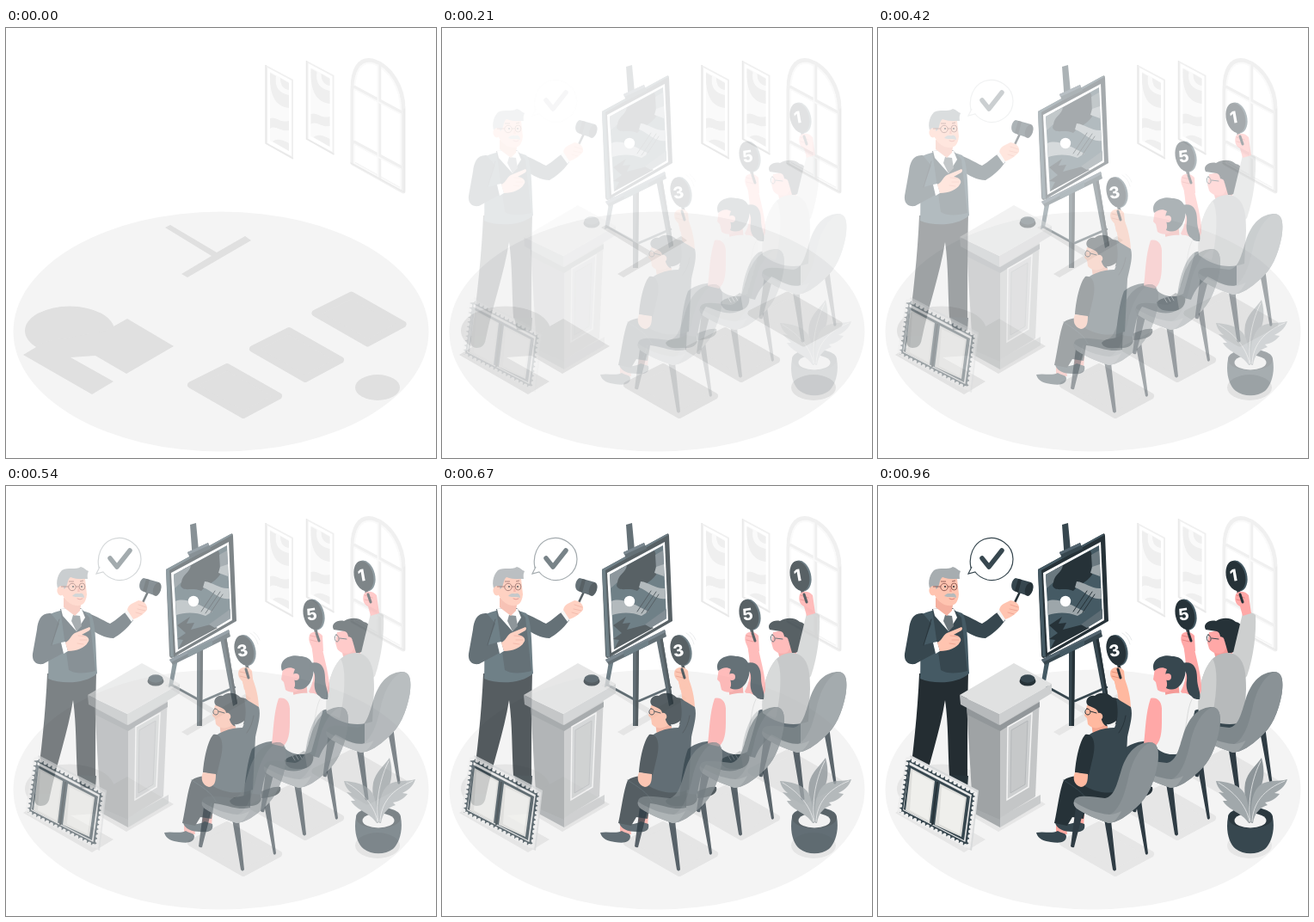
These frames come from a looping animation (500x500 px, 1 s). An HTML page:

```html
<!DOCTYPE html>
<html lang="en">
<head>
<meta charset="utf-8">
<title>Auction</title>
<style>
html, body { margin: 0; width: 100%; height: 100%; overflow: hidden; background: #fff; }
svg { display: block; width: 100vw; height: 100vh; }
text { font: 800 19px Inter, "Open Sans", sans-serif; fill: #fff; text-anchor: middle; }
.round { stroke-linecap: round; stroke-linejoin: round; }
.line { fill: none; stroke-linecap: round; stroke-linejoin: round; }
</style>
</head>
<body>
<svg viewBox="0 0 500 500">
<defs>
  <g id="wallPicture">
    <path d="M302 43L334 60V152L302 134Z" fill="#f0f0f0"/>
    <path d="M304 46L332 61V149L304 134Z" fill="#fff"/>
    <path d="M307 51L329 63V143L307 131Z" fill="#fafafa"/>
    <path d="M307 52L314 56C312 69 318 76 329 78V93C313 91 306 78 307 52ZM319 58L329 64V72C322 71 319 66 319 58ZM307 105C314 102 319 111 329 108V119C319 121 313 112 307 117ZM310 132C315 127 324 131 329 134V143Z" fill="#efefef"/>
    <path d="M302 43V134L334 152" fill="none" stroke="#e9e9e9" stroke-width="1.5"/>
  </g>
  <path id="chairShadow" class="round" d="M257 394L317 428L276 450L215 415Z" stroke="currentColor" stroke-width="8"/>
  <g id="chair">
    <path d="M230 373L239 377L228 420Q226 421 224 419ZM263 387L271 389L277 446Q275 449 273 446ZM300 370L306 365L314 427Q313 430 311 428Z" fill="#2f3c44"/>
    <path d="M228 366C230 358 247 361 264 363C275 361 278 346 283 330C290 308 302 298 317 298C326 299 327 309 325 324C321 346 313 363 300 374C289 384 279 391 268 392C253 387 240 381 231 375C228 372 227 369 228 366Z" fill="#7f888c"/>
    <path d="M270 382C282 375 287 357 291 340C296 317 306 302 317 298C326 299 327 309 325 324C321 346 313 363 300 374C289 384 279 391 268 392Z" fill="#8a9296"/>
    <path d="M228 367C240 375 255 381 269 382C274 382 279 380 283 378C279 386 274 392 268 392C253 387 240 381 231 375C228 372 227 370 228 367Z" fill="#9aa1a4"/>
  </g>
  <g id="paddle">
    <path class="line" d="M2 15L5 30" stroke="#263238" stroke-width="3.6"/>
    <ellipse cx="1.1" cy=".2" rx="11.5" ry="18.3" transform="rotate(-14)" fill="#455a64"/>
    <ellipse cx="-.6" rx="11" ry="17.8" transform="rotate(-14)" fill="#263238"/>
  </g>
</defs>

<ellipse cx="250" cy="353" rx="241.5" ry="139.5" fill="#f4f4f4"/>
<g id="shadows" fill="currentColor">
  <path d="M185 232L191 229L245 261L278 242L285 247L211 290L204 286L239 265Z"/>
  <ellipse cx="74" cy="352" rx="52" ry="28.5"/>
  <path d="M141 338L195 370L140 402L104 381L75 383L125 411L100 426L20 380L45 365L116 352Z"/>
  <use href="#chairShadow"/>
  <use href="#chairShadow" x="72" y="-42"/>
  <use href="#chairShadow" x="144.500" y="-83.500"/>
  <ellipse cx="432" cy="418" rx="26" ry="15"/>
</g>
<use href="#wallPicture"/>
<use href="#wallPicture" x="47.500" y="-5"/>
<g class="line">
  <path d="M403 157V71C403 48 411 35 426 38C447 44 462 69 462 94V190Z" stroke="#f0f0f0" stroke-width="5"/>
  <path d="M405 157V71C406 49 413 39 426 41C446 47 459 71 459 95V187Z" stroke="#fafafa" stroke-width="2"/>
  <path d="M434 43V174M405 69L459 98M405 133L459 162" stroke="#f0f0f0" stroke-width="4.500"/>
  <path d="M432.500 43V173M405 71L459 100M405 135L459 164" stroke="#fafafa" stroke-width="1.500"/>
  <path d="M463 94V191L401 157" stroke="#e9e9e9" stroke-width="1.400"/>
</g>

<!-- easel -->
<g class="fade">
  <path d="M214 45L221 43L225 85L217 87ZM222 188H229L228 279L222 279ZM249 177L256 174L269 253L264 256Z" fill="#37474f"/>
  <path d="M195 198L201 196L194 232L189 234Z" fill="#455a64"/>
  <path class="line" d="M192 231L225 249M229 250L266 234" stroke="#37474f" stroke-width="2.600"/>
  <path d="M226 188H229L228 279L225 279ZM253 175L256 174L269 253L267 254Z" fill="#263238"/>
  <path d="M186 97L261 56Q264 54 264 58L268 157L193 200Q190 200 190 196Z" fill="#263238"/>
  <path d="M186 97L261 56L263 57L190 98L195 199L191 198Z" fill="#455a64"/>
  <path d="M192 101L259 65L263 156L197 194Z" fill="#fff"/>
  <path d="M195 103L257 69L261 154L200 190Z" fill="#455a64"/>
  <path d="M206 97L247 75C251 84 248 91 249 103C242 113 235 113 227 122C215 117 207 124 203 116Z" fill="#263238"/>
  <path d="M195 103L215 92C214 101 205 102 204 112L196 119ZM248 80L257 75L258 94L249 96Z" fill="#6b7980"/>
  <path d="M197 134C208 129 225 138 240 146L232 151C220 146 207 147 198 150ZM231 111C241 112 249 120 259 119L260 131C248 133 240 122 229 118ZM249 94L258 91V105L247 101Z" fill="#9da6aa"/>
  <path d="M199 162L214 152L210 160L219 159L215 167L238 161L246 165L200 190L206 179L199 178L209 171Z" fill="#263238"/>
  <path d="M236 161L261 143V154L243 165Z" fill="#5d6c74"/>
  <path class="line" d="M227 146L243 122M232 148L249 123M238 147L252 126" stroke="#263238" stroke-width="1"/>
  <circle cx="218" cy="134" r="6.200" fill="#fff"/>
  <path d="M211 77L235 66L238 73L214 84ZM190 202L259 167L261 175L194 208Z" fill="#37474f"/>
  <path d="M211 77L235 66L236 69L212 80ZM190 202L259 167L260 170L192 205Z" fill="#546570"/>
  <path d="M211 193L240 179V185L212 199Z" fill="#455a64"/>
</g>

<!-- auctioneer -->
<g class="fade">
  <path d="M48 218L105 216C104 260 104 300 104 340C98 345 89 343 83 337C81 306 82 277 78 249C72 287 59 322 51 361C46 365 39 365 34 361C41 311 46 264 48 218Z" fill="#242d32"/>
  <path d="M34 358L51 358C51 368 47 372 40 372C33 371 32 365 34 358ZM84 336L105 337L104 352L87 351Z" fill="#263238"/>
  <path d="M91 147C102 149 112 156 121 160C128 156 134 150 140 146L148 156C141 166 132 173 125 177C115 177 105 171 99 167Z" fill="#37474f"/>
  <path d="M138 147L143 143L150 152L146 158Z" fill="#f4f4f4"/>
  <path d="M51 149C64 143 80 140 98 148C105 158 104 186 106 218C93 230 65 231 49 224C50 194 48 169 51 149Z" fill="#455a64"/>
  <path d="M63 143L87 142L97 153L104 215C94 218 80 219 73 214Z" fill="#37474f"/>
  <path d="M64 143L88 143L92 153L82 169L66 151Z" fill="#fff"/>
  <path d="M78 150L86 151L88 163L82 169L76 157Z" fill="#6d777c"/>
  <path d="M67 130L88 132L86 145L80 151L67 141Z" fill="#f5b09f"/>
  <path d="M64 105C74 99 88 100 92 108L94 126C93 136 89 140 81 139C70 137 64 127 62 115Z" fill="#ffc4b0"/>
  <path d="M62 123C57 115 59 104 65 98C72 94 81 98 87 94C91 95 93 98 96 99C94 103 95 106 95 108C89 108 82 109 75 106C71 109 72 115 69 119Z" fill="#a7adb0"/>
  <path d="M67 117C61 114 57 121 61 126C64 129 67 127 68 123Z" fill="#ffc4b0"/>
  <path d="M77 128C81 123 84 126 86 125C89 124 91 127 91 130C87 128 82 130 77 128Z" fill="#b5babc"/>
  <path class="line" d="M83 131Q86 133 89 131" stroke="#d97f77" stroke-width="1"/>
  <g fill="none" stroke="#8c5751" stroke-width=".9">
    <circle cx="77" cy="117.500" r="4.200"/><ellipse cx="88.500" cy="117" rx="3.400" ry="4"/>
    <path d="M64 117L73 117M81 117H85M73 111L79 111M86 111L90 110"/>
  </g>
  <circle cx="78" cy="117" r="1" fill="#263238"/><circle cx="88" cy="117" r="1" fill="#263238"/>
  <path d="M84 117L86 123H83" fill="#f2a090"/>
  <path d="M52 148C41 147 37 156 36 167L31 195C30 204 35 208 43 207L67 194L64 182L53 185L62 160Z" fill="#37474f"/>
  <path class="line" d="M62 155L53 185" stroke="#263238" stroke-width=".8"/>
  <path d="M64 182L69 181L72 192L67 195Z" fill="#fff"/>
  <path d="M69 182C74 180 76 173 80 171L97 164Q99 165 97 168L88 173C96 174 98 179 95 182C92 188 82 192 72 192Z" fill="#ffc4b0"/>
  <path class="line" d="M84 174L93 175M86 179L94 179M83 183L90 184" stroke="#ee9f8d" stroke-width=".8"/>
  <path class="line" d="M153 148L165 123" stroke="#263238" stroke-width="2.600"/>
  <path d="M160 107L178 112C183 115 180 125 175 128L158 122C153 119 155 109 160 107Z" fill="#37474f"/>
  <ellipse cx="175.500" cy="120" rx="4.300" ry="8" transform="rotate(18 175.500 120)" fill="#263238"/>
  <path d="M163 108L167 109L163 124L159 122Z" fill="#263238"/>
  <path d="M141 144C142 137 149 136 154 133C161 134 165 138 164 144C160 149 154 153 148 155Z" fill="#ffc4b0"/>
  <path class="line" d="M154 138L163 141M153 143L162 145M151 147L158 149" stroke="#ee9f8d" stroke-width=".8"/>
</g>

<path id="bubble" d="M108 95C105 81 111 67 123 62C140 56 157 69 157 85C157 101 142 112 127 109C120 107 116 104 113 100L105 102L109 94" fill="#fff" stroke="#37474f" stroke-width="1.200"/>
<path id="check" class="line" d="M121 84L129 94L144 75" stroke="#37474f" stroke-width="5.500"/>

<!-- lectern -->
<g class="fade">
  <path d="M105 368L142 386V397L107 378Z" fill="#a6aaac"/>
  <path d="M142 385L189 359V369L142 397Z" fill="#c9cbcc"/>
  <path d="M103 254L142 269V388L110 374Z" fill="#9fa3a5"/>
  <path d="M142 269L188 244L183 361L142 386Z" fill="#c4c6c7"/>
  <path d="M103 258L142 278L188 251V257L142 285L104 266Z" fill="#92979a"/>
  <path d="M151 280L179 264L175 350L150 365Z" fill="#cdcfd0" stroke="#f3f3f3" stroke-width="1.500"/>
  <path d="M155 284L174 273L171 347L154 357Z" fill="#c6c8c9" stroke="#b5b8ba"/>
  <path d="M95 243L141 265V278L96 254Z" fill="#b7babc"/>
  <path d="M141 265L202 230V241L141 278Z" fill="#cdcfd0"/>
  <path d="M95 243L158 206L202 230L141 265Z" fill="#e0e1e1"/>
  <ellipse cx="174" cy="227" rx="9.500" ry="5.500" fill="#263238"/>
  <ellipse cx="174" cy="224" rx="8.500" ry="4.700" fill="#37474f"/>
</g>

<!-- ornate frame -->
<g class="fade">
  <path d="M38 313L117 354L109 424L102 421L33 323Z" fill="#d8dadb"/>
  <path d="M36 316L114 357L106 421L24 379L33 319Z" fill="#e9e9e9" stroke="#e9e9e9" stroke-width="3" stroke-linejoin="round"/>
  <path d="M37 319L111 358L103 417L27 378L35 319Z" fill="none" stroke="#37474f" stroke-width="4"/>
  <path class="line" d="M36 317L113 357L105 420L25 379L34 317Z" stroke="#efefef" stroke-width="4.500" stroke-dasharray="0 5.500"/>
  <path d="M36 324L107 361L100 412L30 376Z" fill="#37474f"/>
  <path d="M38 328L66 343L60 392L32 377Z" fill="#dededb"/>
  <path d="M72 346L103 362L97 408L66 394Z" fill="#dededb"/>
  <path d="M40 331L64 344L59 389L37 377ZM74 350L101 363L95 405L71 393Z" fill="#efefec"/>
  <path d="M69 344L63 394" stroke="#263238" stroke-width="2"/>
</g>

<!-- bidder, back row -->
<g class="fade">
  <path d="M417 273L417 299C404 303 391 292 383 289C375 298 369 303 364 316L348 312C350 292 357 268 368 261C382 256 402 261 417 273Z" fill="#37474f"/>
  <path d="M324 319C329 313 339 314 346 308L357 313C359 322 352 330 341 329C333 329 325 328 324 319Z" fill="#263238"/>
  <path class="line" d="M333 314L336 319M337 313L340 318M341 312L344 317" stroke="#fff" stroke-width="1"/>
  <path d="M390 190L411 185L413 200L394 206Z" fill="#f59a97"/>
  <path d="M385 170L407 166L409 182L402 193C396 197 388 194 385 189L383 182Z" fill="#ffa8a7"/>
  <path d="M381 167C377 160 386 155 393 157C401 152 411 153 416 158C424 159 425 169 420 175C424 187 416 195 407 194L403 180C396 180 400 171 394 169Z" fill="#263238"/>
  <circle cx="398" cy="180" r="4.800" fill="#ffa8a7"/>
  <path class="line" d="M384 173C381 174 382 181 385 181C388 181 388 174 384 173ZM388 177L396 178" stroke="#37474f" stroke-width="1"/>
  <path d="M412 198L424 148Q432 144 439 150C440 170 437 198 429 221L418 232Z" fill="#cdcfcf"/>
  <path d="M390 200C399 193 411 192 418 198C427 205 428 220 428 236L426 274C409 280 390 277 373 264C371 240 377 213 390 200Z" fill="#b7babb"/>
  <path d="M389 201C396 212 394 244 388 270L373 264C371 240 377 213 389 201Z" fill="#cdcfcf"/>
  <use href="#paddle" x="416.500" y="104.500"/>
  <text transform="translate(414.500 110.500) rotate(-10)">1</text>
  <path d="M416 126C419 121 427 122 431 127L434 148L424 151L421 140C416 138 414 132 416 126Z" fill="#ffa8a7"/>
  <path class="line" d="M417 127L426 130M417 132L425 134" stroke="#e78380" stroke-width="1"/>
  <path class="line" d="M421 126L424 135" stroke="#263238" stroke-width="3"/>
</g>
<g class="fade"><use href="#chair" x="144.500" y="-82"/></g>

<!-- bidder, middle row -->
<g class="fade">
  <path d="M345 297L350 327C334 337 320 328 307 324C301 332 299 346 296 363L276 365C278 341 281 319 286 306C299 294 326 295 345 297Z" fill="#37474f"/>
  <path d="M260 366C266 359 275 363 283 357L296 359C299 367 293 372 283 372C274 372 262 374 260 366ZM297 355C304 353 310 349 319 350C321 357 314 362 297 363Z" fill="#263238"/>
  <path d="M355 184L366 180C370 202 377 222 376 238C373 251 357 247 352 239C361 224 358 203 355 184Z" fill="#ffa8a7"/>
  <path d="M333 233L349 226L351 246L335 249Z" fill="#f59a97"/>
  <path d="M322 212L343 207L348 228C343 239 333 243 325 237L323 228L320 225Z" fill="#ffa8a7"/>
  <path d="M321 215C316 201 332 195 342 198C354 198 360 207 357 220C354 233 345 240 335 235C339 228 331 222 336 213C331 210 326 211 321 215Z" fill="#37474f"/>
  <path d="M354 206C366 203 371 211 371 223C371 234 376 240 374 248C363 249 357 238 359 226C360 218 357 213 353 213Z" fill="#37474f"/>
  <circle cx="337" cy="222" r="4" fill="#ffa8a7"/>
  <path d="M326 246C336 241 345 240 358 241C369 244 371 254 367 267L355 309C342 316 327 310 323 303L326 280Z" fill="#f3f3f3"/>
  <path class="line" d="M365 248C358 262 361 278 352 299" stroke="#d9dada" stroke-width="1"/>
  <path d="M317 247C325 245 331 251 330 263C330 281 331 295 322 303L309 300C311 285 311 264 317 247Z" fill="#ffa8a7"/>
  <use href="#paddle" x="357.500" y="149.500"/>
  <text transform="translate(356.500 156) rotate(-8)">5</text>
  <path d="M353 173C356 168 364 169 368 174L369 192L357 194C357 186 350 182 353 173Z" fill="#ffa8a7"/>
  <path class="line" d="M354 174L363 176M354 179L362 181" stroke="#e78380" stroke-width="1"/>
  <path class="line" d="M361 171L364 180" stroke="#263238" stroke-width="3"/>
</g>
<g class="fade"><use href="#chair" x="72" y="-41"/></g>

<!-- bidder, front row -->
<g class="fade">
  <path d="M207 391L218 390L220 405L207 405ZM229 381L240 382L239 396L228 395Z" fill="#ffa8a0"/>
  <path d="M184 403C194 401 201 405 209 401C214 404 218 403 219 407C219 416 209 415 201 414C194 413 186 411 184 403ZM206 391C216 394 225 394 231 390L240 393C242 402 234 403 226 402C217 402 207 399 206 391Z" fill="#37474f"/>
  <path d="M285 343L284 374C271 378 254 370 242 369L239 387L226 385L220 395L205 392C209 374 211 354 216 342C224 336 236 337 247 336Z" fill="#263238"/>
  <path class="line" d="M216 342C228 350 239 356 244 367M239 369L234 384" stroke="#37474f" stroke-width="1"/>
  <path d="M273 222L285 220C291 233 294 247 294 261L279 262C281 249 278 235 273 222Z" fill="#ffb9a0"/>
  <path d="M248 275L266 270L268 289L250 290Z" fill="#f3a58f"/>
  <path d="M243 255L263 251L267 272C262 283 250 284 244 277L243 270L240 267Z" fill="#ffb9a0"/>
  <path d="M244 255C239 249 246 242 252 244C258 239 267 240 273 246C283 246 285 255 282 261C285 272 277 281 265 279C259 275 261 269 256 266C257 259 250 258 244 255Z" fill="#263238"/>
  <path d="M266 277C270 278 274 275 277 273L275 280L268 283Z" fill="#f4f4f4"/>
  <circle cx="257" cy="268" r="4.300" fill="#ffb9a0"/>
  <path class="line" d="M243 259C240 260 240 266 244 266C248 266 248 259 243 259ZM247 262L254 264" stroke="#263238" stroke-width="1"/>
  <path d="M277 247Q286 252 294 257C297 267 292 281 290 292L287 353C270 360 250 356 238 347L236 299C244 286 261 281 275 281C280 271 279 258 277 247Z" fill="#37474f"/>
  <path d="M241 289C250 287 254 299 250 315L245 336L229 333C230 319 234 297 241 289Z" fill="#263238"/>
  <path d="M229 333L244 335C244 343 243 349 236 350C228 348 226 340 229 333Z" fill="#ffb9a0"/>
  <path class="line" d="M288 267Q286 279 280 287" stroke="#263238" stroke-width=".9"/>
  <use href="#paddle" x="277.500" y="191"/>
  <text transform="translate(276 198) rotate(-9)">3</text>
  <path d="M271 214C275 209 283 210 286 215L288 233L277 237L275 227C270 223 269 218 271 214Z" fill="#ffb9a0"/>
  <path class="line" d="M272 216L281 218M272 221L280 223" stroke="#e99279" stroke-width="1"/>
  <path class="line" d="M279 213L282 223" stroke="#263238" stroke-width="3"/>
  <path class="line" d="M284 171Q291 175 293 184M288 170Q293 173 295 179" stroke="#dadddf" stroke-width=".7"/>
</g>
<g class="fade"><use href="#chair"/></g>

<!-- plant -->
<g class="fade">
  <path d="M407 385C407 370 459 370 459 385C462 401 457 416 450 422C441 429 425 429 416 422C408 416 404 400 407 385Z" fill="#37474f"/>
  <ellipse cx="433" cy="386" rx="26" ry="12" fill="#2b383f"/>
  <ellipse cx="433" cy="389" rx="18.500" ry="8.500" fill="#f1f1f1"/>
  <path d="M432 391C431 377 424 361 427 345C430 332 440 325 446 316C450 330 449 344 443 354C436 364 435 378 434 391Z" fill="#8d9599"/>
  <path d="M431 392C423 379 408 378 401 366L406 366L396 356L402 357C396 352 394 348 393 343C408 344 423 348 428 361C431 371 432 382 433 392Z" fill="#a1a8ab"/>
  <path d="M434 392C433 374 434 357 444 348C453 341 465 344 476 341C473 350 467 354 461 357L467 358C461 365 456 367 450 368L453 371C444 374 438 380 436 392Z" fill="#a1a8ab"/>
  <path class="line" d="M433 390C429 366 436 337 445 320M432 390C428 370 413 355 396 345M435 390C436 369 448 353 473 343" stroke="#dfe1e2" stroke-width=".9"/>
</g>
</svg>
<script>
const LOOP = 1000, FPS = 24, START = 3;
const fades = document.querySelectorAll(".fade");
const [bubble, check, shadows] = ["bubble", "check", "shadows"].map(id => document.getElementById(id));

// Opacity advances in discrete ticks, easing gently at both ends.
function fadeAt(ms) {
  const tick = Math.floor((ms + 5) * FPS / 1000);
  if (tick < START) return 0;
  const u = Math.min(1, (tick + 0.5) / FPS);
  return u * u * (3 - 2 * u);
}

function draw(ms) {
  const a = fadeAt(ms % LOOP);
  fades.forEach(el => el.setAttribute("opacity", a));
  bubble.setAttribute("opacity", a ** 3);
  check.setAttribute("opacity", a ** 1.5);
  const tone = Math.round(224 + 6 * a);
  shadows.style.color = `rgb(${tone},${tone},${tone})`;
}

const begin = performance.now();
function frame() {
  draw(performance.now() - begin);
  requestAnimationFrame(frame);
}
draw(0);
requestAnimationFrame(frame);
</script>
</body>
</html>
```
